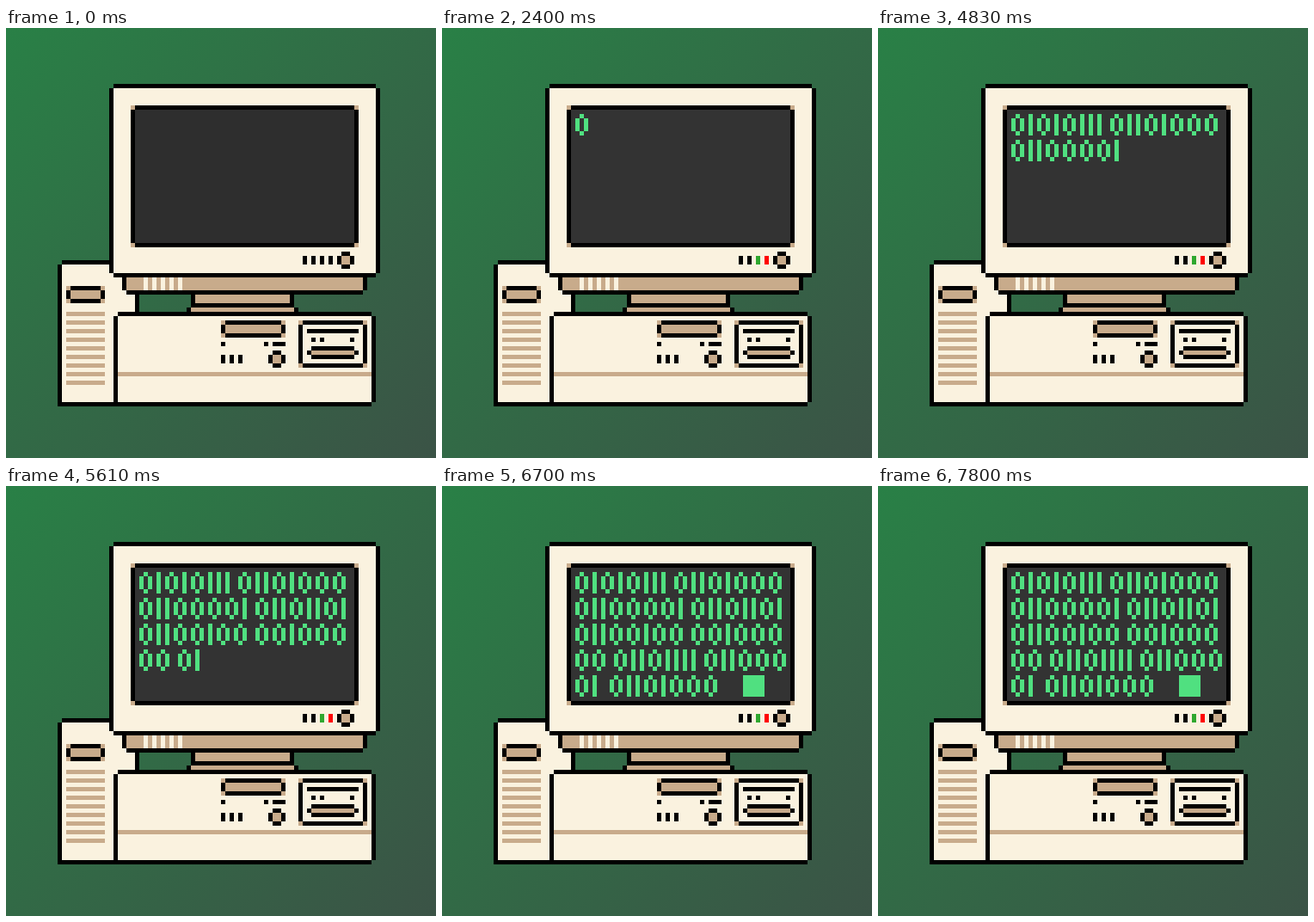
An HTML page without scripts that plays this animation: 500 px wide and 500 px high, repeating every 8000 ms.

```html
<!DOCTYPE html>
<html lang="en">
<head>
<meta charset="utf-8">
<title>Pixel computer</title>
<style>
  :root { --green: #50e080; --loop: 8s step-end infinite; }
  html, body { margin: 0; width: 100%; height: 100%; overflow: hidden; }
  body { position: relative; background: linear-gradient(135deg, #298046, #3b5346); }
  svg { position: absolute; left: 0; top: 0; width: 500px; height: 500px; shape-rendering: crispEdges; }
  .ink { fill: #000; }
  .cream { fill: #faf2df; }
  .tan { fill: #c8ab8b; }
  .screen { fill: #2e2e2e; animation: power var(--loop); }
  .leds { animation: leds var(--loop); }

  .mark { position: absolute; width: 25px; height: 25px; background: var(--green); transform: scale(0); }
  .intro { left: 265px; top: 165px; animation: intro var(--loop); }
  .outro { left: 350px; top: 220px; animation: outro var(--loop); }

  /* Binary text: i is a zero, b is a one */
  .text { position: absolute; left: 0; top: 0; animation: text var(--loop); }
  .row { position: absolute; left: 155px; display: flex; gap: 5px; }
  .row > * {
    flex: none; height: 25px; opacity: 0;
    animation: type var(--loop);
    animation-delay: calc(var(--start) + var(--k) * 30ms);
  }
  .row b { width: 5px; background: var(--green); }
  .row i {
    --px: linear-gradient(var(--green) 0 0) no-repeat;
    width: 15px;
    background:
      linear-gradient(var(--green) 0 0) 5px 0 / 5px 5px no-repeat,
      linear-gradient(var(--green) 0 0) 5px 20px / 5px 5px no-repeat,
      linear-gradient(var(--green) 0 0) 0 5px / 5px 15px no-repeat,
      linear-gradient(var(--green) 0 0) 10px 5px / 5px 15px no-repeat;
  }
  .row .gap { margin-left: 5px; }
  .r1 { top: 100px; --start: 4110ms; }
  .r2 { top: 130px; --start: 4590ms; }
  .r3 { top: 160px; --start: 5070ms; }
  .r4 { top: 190px; --start: 5490ms; }
  .r5 { top: 220px; --start: 5970ms; }
  .r5 .gap { margin-left: 10px; }

  .row :nth-child(1) { --k: 1; }
  .row :nth-child(2) { --k: 2; }
  .row :nth-child(3) { --k: 3; }
  .row :nth-child(4) { --k: 4; }
  .row :nth-child(5) { --k: 5; }
  .row :nth-child(6) { --k: 6; }
  .row :nth-child(7) { --k: 7; }
  .row :nth-child(8) { --k: 8; }
  .row :nth-child(9) { --k: 9; }
  .row :nth-child(10) { --k: 10; }
  .row :nth-child(11) { --k: 11; }
  .row :nth-child(12) { --k: 12; }
  .row :nth-child(13) { --k: 13; }
  .row :nth-child(14) { --k: 14; }
  .row :nth-child(15) { --k: 15; }
  .row :nth-child(16) { --k: 16; }

  .r1 > :nth-child(1) { opacity: 1; animation: none; }
  .r1 > :nth-child(2) { animation: blink var(--loop); }

  /* Half a loop is long enough: .text hides the tail that wraps around */
  @keyframes type { 0% { opacity: 1; } 50%, 100% { opacity: 0; } }
  @keyframes blink {
    0%, 37.5%, 45% { opacity: 0; }
    33.75%, 41.25%, 48.75%, 100% { opacity: 1; }
  }
  @keyframes text {
    0%, 91.25%, 96.25% { opacity: 0; }
    30%, 93.75%, 97.5%, 100% { opacity: 1; }
  }
  @keyframes leds {
    0%, 5%, 7.5% { opacity: 0; }
    3.75%, 6.25%, 8.75%, 100% { opacity: 1; }
  }
  @keyframes power { 0% { fill: #2e2e2e; } 8.75%, 100% { fill: #333; } }
  @keyframes intro {
    0%, 25%, 100% { transform: scale(0); }
    11.25%, 23.75% { transform: scale(.2); }
    12.5%, 22.5% { transform: scale(.6); }
    13.75%, 16.25%, 21.25% { transform: scale(1); }
    15%, 18.75% { transform: scale(1.4); }
    20% { transform: scale(1.8); }
  }
  @keyframes outro {
    0% { transform: scale(0); }
    78.75% { transform: scale(.2); }
    80% { transform: scale(.4); }
    81.25% { transform: scale(.6); }
    82.5% { transform: scale(.8); }
    83.75%, 100% { transform: scale(1); }
  }
</style>
</head>
<body>
<svg viewBox="0 0 100 100">
  <defs>
    <g id="knob">
      <path class="ink" d="M1 0h2v4H1zM0 1h4v2H0z"/>
      <path class="tan" d="M1 1h2v2H1z"/>
    </g>
  </defs>

  <!-- tower -->
  <path class="ink" d="M13 54h12v1H13zM12 55h1v33H12zM30 62h1v4H30z"/>
  <path class="cream" d="M13 55h12v2h5v9H26v21H13z"/>
  <path class="tan" d="M14 60h9v4H14z"/>
  <path class="ink" d="M15 60h7v4H15zM14 61h9v2H14z"/>
  <path class="tan" d="M15 61h7v2H15z"/>
  <path class="tan" d="M14 66h9v1H14zm0 2h9v1H14zm0 2h9v1H14zm0 2h9v1H14zm0 2h9v1H14zm0 2h9v1H14zm0 2h9v1H14zm0 2h9v1H14zm0 2h9v1H14z"/>

  <!-- stand -->
  <path class="ink" d="M27 58h57v3H27zM28 61h55v1H28zM43 62h24v3H43zM42 65h26v1H42z"/>
  <path class="tan" d="M28 58h55v3H28zM44 62h22v2H44zM43 65h24v1H43z"/>
  <path class="cream" d="M32 58h1v3h-1zm2 0h1v3h-1zm2 0h1v3h-1zm2 0h1v3h-1zm2 0h1v3h-1z"/>

  <!-- monitor -->
  <path class="ink" d="M25 13h61v45H25zM24 14h63v43H24z"/>
  <path class="cream" d="M25 14h61v43H25z"/>
  <path class="tan" d="M29 18h53v33H29z"/>
  <path class="ink" d="M30 18h51v33H30zM29 19h53v31H29z"/>
  <path class="screen" d="M30 19h51v31H30z"/>
  <path class="ink" d="M69 53h1v2h-1zm2 0h1v2h-1zm2 0h1v2h-1zm2 0h1v2h-1z"/>
  <g class="leds">
    <path fill="#2fa82f" d="M73 53h1v2h-1z"/>
    <path fill="#f00" d="M75 53h1v2h-1z"/>
  </g>
  <use href="#knob" x="77" y="52"/>

  <!-- case -->
  <path class="ink" d="M26 66h59v1H26zM25 67h61v20H25zM12 87h73v1H12z"/>
  <path class="cream" d="M25 66h1v1h-1zM26 67h59v20H26z"/>
  <path class="tan" d="M26 80h59v1H26zM50 68h15v4H50zM68 68h16v11H68z"/>
  <path class="ink" d="M51 68h13v4H51zM50 69h15v2H50zM69 68h14v11H69zM68 69h16v9H68z"/>
  <path class="tan" d="M51 69h13v2H51z"/>
  <path class="ink" d="M50 73h1v1h-1zM60 73h1v1h-1zM62 73h3v1h-3zM50 76h1v2h-1zm2 0h1v2h-1zm2 0h1v2h-1z"/>
  <use href="#knob" x="61" y="75"/>
  <path class="cream" d="M69 69h14v9H69z"/>
  <path class="ink" d="M70 70h12v1H70zM71 72h1v1h-1zm2 0h1v1h-1zm7 0h1v1h-1zM71 74h10v3H71zM70 75h12v1H70z"/>
  <path class="tan" d="M71 75h10v1H71z"/>
</svg>

<div class="mark intro"></div>

<div class="text">
  <div class="row r1"><i></i><b></b><i></i><b></b><i></i><b></b><b></b><b></b><i class="gap"></i><b></b><b></b><i></i><b></b><i></i><i></i><i></i></div>
  <div class="row r2"><i></i><b></b><b></b><i></i><i></i><i></i><i></i><b></b><i class="gap"></i><b></b><b></b><i></i><b></b><b></b><i></i><b></b></div>
  <div class="row r3"><i></i><b></b><b></b><i></i><i></i><b></b><i></i><i></i><i class="gap"></i><i></i><b></b><i></i><i></i><i></i></div>
  <div class="row r4"><i></i><i></i><i class="gap"></i><b></b><b></b><i></i><b></b><b></b><b></b><b></b><i class="gap"></i><b></b><b></b><i></i><i></i><i></i></div>
  <div class="row r5"><i></i><b></b><i class="gap"></i><b></b><b></b><i></i><b></b><i></i><i></i><i></i></div>
  <div class="mark outro"></div>
</div>
</body>
</html>
```
